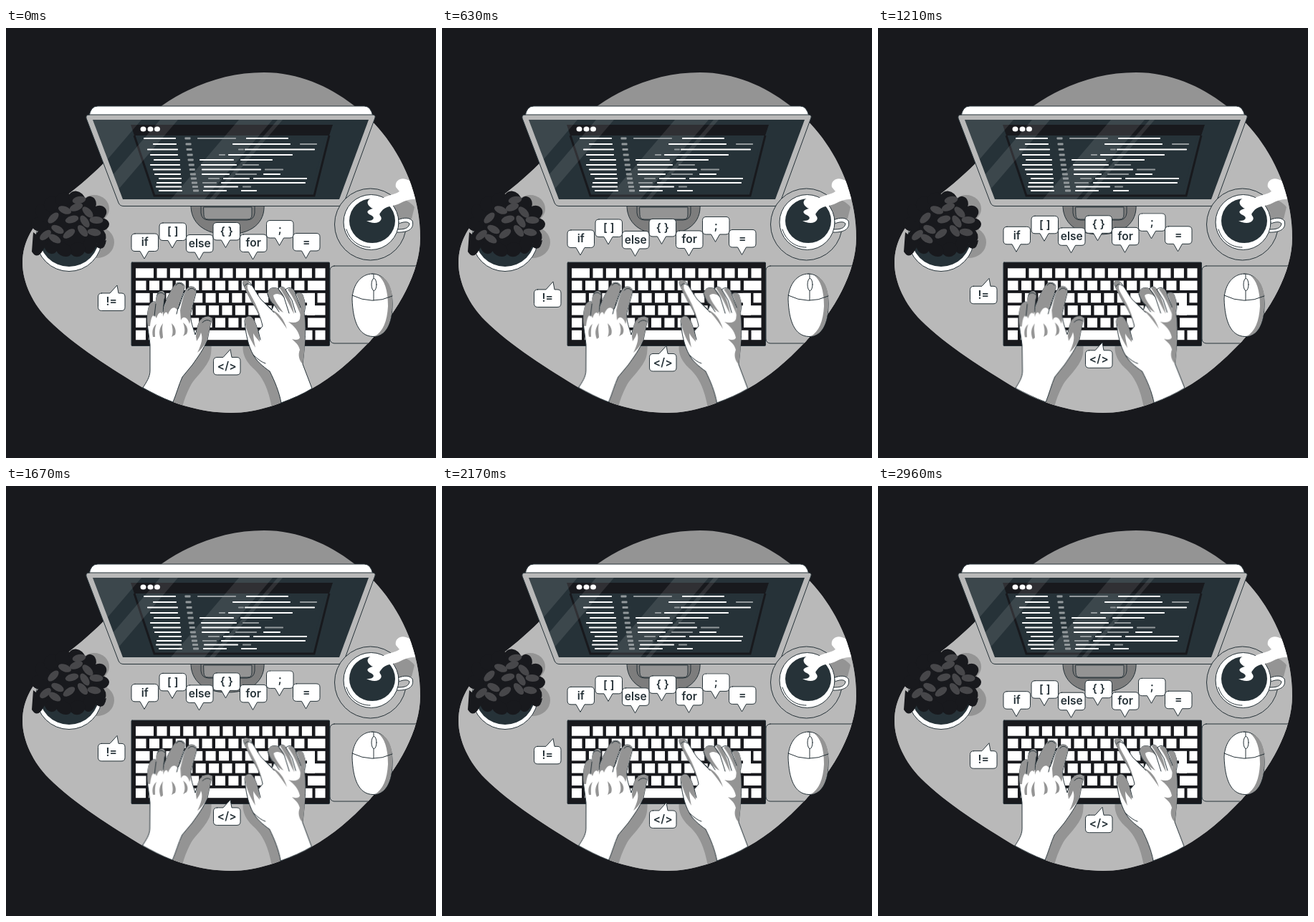
These frames come from a looping animation (600x600 px, 3000 ms). An HTML page:

```html
<!DOCTYPE html>
<html lang="en">
<head>
<meta charset="utf-8">
<title>Coding desk</title>
<style>
  html, body { margin: 0; width: 100%; height: 100%; overflow: hidden; background: #18191d; }
  svg { display: block; width: 100vw; height: 100vh; }
  text { font: 600 15.5px Inter, "Open Sans", sans-serif; fill: #263238; text-anchor: middle; }
  .ink { stroke: #263238; stroke-width: 1; stroke-linejoin: round; stroke-linecap: round; }
  .white { fill: #fff; }
  .desk { fill: #b9b9b9; }
  .grey { fill: #949494; }
  .dark { fill: #263238; }
  .black { fill: #18191d; }
  .none { fill: none; }
  #bubbles { animation: float 3s linear infinite; }
  .hand { animation: sway 1.5s linear infinite; }
  #left { transform-origin: 237px 437px; }
  #right { transform-origin: 379px 437px; }
  @keyframes float { 50% { transform: translateY(-12px); } }
  @keyframes sway {
    0%, 50%, 100% { transform: rotate(0deg); }
    25% { transform: rotate(1deg); }
    75% { transform: rotate(-1deg); }
  }
</style>
</head>
<body>
<svg viewBox="0 0 600 600">
  <defs>
    <path id="blob" d="M360 62C408 62 450 81 484 107C510 125 534 154 549 182C568 217 578 255 578 293C578 341 546 398 504 441C482 464 456 487 427 503C392 521 355 537 314 537C266 537 222 520 191 502C150 477 95 443 60 408C38 386 23 355 23 328C23 290 47 263 74 242C96 225 115 210 137 188C164 162 186 129 218 108C262 78 310 62 360 62Z"/>
    <clipPath id="inBlob"><use href="#blob"/></clipPath>
    <clipPath id="inScreen"><path d="M121 128H506L465 239H163Z"/></clipPath>
  </defs>

  <!-- wall and desk -->
  <use href="#blob" class="grey"/>
  <g clip-path="url(#inBlob)">
    <path class="desk" d="M0 122H600V600H0Z"/>
    <rect class="desk ink" x="452" y="332" width="140" height="108" rx="6"/>
    <path class="grey" d="M287 408C284 430 290 452 283 464C275 480 262 489 257 500C251 512 248 521 245 532L230 530L246 487L268 452Z"/>
    <path class="grey" d="M332 436C328 450 332 462 344 474C360 488 366 505 371 530L388 526L366 470L346 436Z"/>
  </g>

  <!-- monitor -->
  <path fill="#7d7d7d" class="ink" d="M258 246C257 272 277 288 309 288C342 288 362 272 360 246Z"/>
  <path fill="#7d7d7d" class="ink" d="M272 246V258Q273 268 283 268H336Q346 268 347 258V246Z"/>
  <path class="grey ink" d="M276 250H343V261Q343 267 337 267H282Q276 267 276 261Z"/>
  <path class="white ink" d="M116 123Q118 109 128 109H500Q509 109 512 123Z"/>
  <path class="desk ink" d="M116 121H511Q516 121 515 125L472 243Q470 248.500 464 248.500H164Q159 248.500 157 244L112 126Q111 121 116 121Z"/>
  <path class="dark" d="M121 128H506L465 239H163Z"/>
  <g clip-path="url(#inScreen)">
    <path d="M183 150H446L425 232H207Z" class="dark"/>
    <path class="black" d="M174 135H456L451 150H179Z"/>
    <path class="none" stroke="#18191d" stroke-width="3" d="M179 150L207 234H430L451 150"/>
    <path fill="#fff" opacity=".1" d="M121 128H189L130 197ZM215 128H240L145 239H120ZM325 128H372L277 239H230ZM379 128H386L291 239H284Z"/>
  </g>
  <g class="white">
    <ellipse cx="191.500" cy="141" rx="4" ry="3.500"/>
    <ellipse cx="201.500" cy="141" rx="4" ry="3.500"/>
    <ellipse cx="211" cy="141" rx="4" ry="3.500"/>
  </g>
  <g id="code"></g>

  <!-- plant -->
  <g class="grey">
    <ellipse cx="123" cy="252" rx="21" ry="19"/>
    <ellipse cx="127" cy="299" rx="24" ry="22"/>
  </g>
  <circle class="white ink" cx="88" cy="293.500" r="46"/>
  <circle class="dark" cx="88" cy="291" r="42"/>
  <g id="leaves" class="black"><ellipse cx="90" cy="273" rx="46" ry="37"/></g>
  <g id="veins" fill="#47474a"></g>

  <!-- cup -->
  <g clip-path="url(#inBlob)">
    <circle class="desk ink" cx="508.500" cy="274" r="50"/>
    <path class="grey" d="M528 240C548 234 562 240 570 250L566 266L546 270Z"/>
    <path class="white ink" d="M544 269C552 265 562 263 567 269C570 280 562 286 543 285Z"/>
    <path class="desk ink" d="M548 273C553 271 560 269 563 273C562 280 555 281 546 281Z"/>
    <circle class="white ink" cx="509.500" cy="271" r="38.500"/>
    <ellipse class="dark" cx="511" cy="269" rx="32" ry="31"/>
    <path class="none ink" d="M475 281C480 297 493 306 508 306"/>
    <path class="white" d="M544 222C542 214 550 208 558 211L584 220V240C566 238 561 239 551 244C541 250 529 247 523 257C518 262 526 262 523 268C520 273 511 273 503 269C513 270 516 264 509 261C500 257 506 253 512 252C505 249 502 243 507 239C512 234 519 240 525 238C532 233 542 233 549 228Z"/>
  </g>

  <!-- mouse -->
  <path class="white ink" d="M511 343C529 343 539 361 539 385C539 412 530 430.500 512 430.500C492 430 484 409 483 378C484 357 496 343 511 343Z"/>
  <path class="grey" d="M519 345C534 349 540 364 539 386C538 412 531 428 514 430.500C526 424 532 409 533 388C533 366 528 351 519 345Z"/>
  <path class="none ink" d="M483 373Q511 387 539 374M513 343V380"/>
  <ellipse class="white ink" cx="513.500" cy="358" rx="3.500" ry="8.500"/>

  <!-- keyboard -->
  <rect class="black ink" x="175" y="327" width="276.500" height="116.500" rx="1"/>
  <g id="keys" class="white"></g>

  <!-- hands -->
  <g id="left" class="hand">
    <path class="white ink" d="M191 502C196 494 201 487 201 478L201 442C200 430 197 418 197 408C197 398 199 387 202 384C205 381 208 381 209 384C210 374 211 367 217 367C222 367 222 372 221 377L219 391C223 381 229 367 236 358C239 353 249 355 249 361C248 370 243 379 240 392C245 383 248 361 258 361C264 361 266 365 265 370L258 397C256 407 262 420 264 428C267 420 268 410 273 406C279 401 287 402 287 407C284 417 283 426 281 435C276 448 267 460 260 470L246 487C241 498 238 510 233 522C217 516 204 509 191 502Z"/>
    <g class="grey">
      <path d="M198 416C196 402 198 387 202 384C205 381 209 382 209 386L207 402C205 399 202 404 201 416Z"/>
      <path d="M207 400C207 383 211 367 217 367C222 367 222 373 221 379L218 399C215 395 212 398 210 405Z"/>
      <path d="M219 394C224 378 232 362 236 358C239 353 249 355 249 361C248 369 242 381 239 394C236 388 230 389 226 400C224 394 221 396 219 403Z"/>
      <path d="M243 394C246 382 249 361 258 361C265 361 266 366 264 373L257 399C258 406 257 410 256 413C254 404 247 400 244 408Z"/>
      <path d="M265 430C267 418 268 409 273 406C279 401 287 402 287 407C284 417 283 426 281 435C277 443 272 449 267 453C273 441 275 432 272 425C271 430 268 434 266 437Z"/>
      <path d="M205 431C203 421 206 416 210 413C207 420 208 426 208 431ZM216 434C212 424 215 417 219 412C217 420 219 426 219 432ZM231 431C234 425 232 417 231 412C236 416 238 423 236 428ZM247 430C251 424 249 416 247 411C253 415 255 422 252 427Z"/>
    </g>
    <path class="none ink" stroke-width=".8" d="M237 359Q242 353 247 359M254 366Q259 360 264 366M211 372Q216 366 221 372M209 385L207 402M221 378L219 396M240 391L238 399M274 411Q280 405 285 409"/>
  </g>

  <g id="right" class="hand">
    <path class="white ink" d="M384 523C381 507 375 493 368 479C358 472 349 464 345 456C338 444 334 425 333 409C333 403 339 401 343 404C348 409 350 418 352 423L358 416C356 405 350 392 343 382C338 372 333 363 331 357C330 351 336 351 340 355C345 361 350 371 356 379L371 393L374 386C370 383 366 377 365 371C366 362 374 361 380 364C382 359 388 361 390 365C395 360 402 363 404 371C410 368 414 370 415 376C418 384 418 391 416 397C418 412 418 426 417 438C416 450 415 459 414 469L427 503C414 511 400 517 384 523Z"/>
    <g class="grey">
      <path d="M331 356C330 351 336 351 340 355C337 357 336 361 338 366C344 378 353 390 358 414C355 402 349 390 343 382C338 373 333 364 331 356Z"/>
      <path d="M333 409C333 403 339 401 343 404C348 409 350 418 352 424C353 430 354 434 354 438C350 433 347 430 345 426C345 434 347 440 348 446C340 434 335 421 333 409Z"/>
      <path d="M365 371C366 362 374 361 380 364C384 367 387 371 389 377C384 371 377 369 373 373C374 380 381 388 387 397C383 395 378 391 374 386C370 383 366 378 365 371Z"/>
      <path d="M382 363C385 359 390 362 392 369C396 376 400 386 402 399C397 391 392 377 382 363Z"/>
      <path d="M393 365C398 360 403 366 405 376C409 384 411 391 411 400C406 388 401 375 393 365Z"/>
      <path d="M405 371C413 367 416 374 417 384L416 397C419 422 417 449 414 469C409 464 407 456 410 449C408 441 403 438 399 434C405 436 409 435 410 432C408 422 402 416 394 410C402 412 408 411 410 406C412 394 410 382 405 371Z"/>
      <path d="M371 393C380 397 388 406 392 420C385 409 379 402 371 393Z"/>
    </g>
    <path class="none ink" stroke-width=".8" d="M333 360Q336 354 342 359M356 379L374 397M365 371C367 378 370 383 374 386L381 396M380 364L388 376L395 398M390 365L399 380L404 397M404 371L411 390M352 423L355 435M345 456Q355 466 362 468"/>
  </g>

  <g id="bubbles"></g>
</svg>

<script>
  const fill = (id, html) => document.getElementById(id).insertAdjacentHTML("beforeend", html);

  // code rows as "start-end" spans; "g" marks a grey span
  const rows = [
    "192-237 g267-321 335-394", "205-238 316-397 g410-434", "197-240 g324-332 333-431",
    "201-240 g297-306 310-400", "206-243 270-318 327-372", "201-243 272-322 g330-353",
    "205-244 273-356 g361-387", "207-244 273-312 g320-350 359-383", "213-245 g282-298 303-340 345-420",
    "210-245 g274-294 300-418", "209-245 276-324 g330-342", "213-246 275-308 328-350"
  ];
  const span = (a, b, y, color, h = 2) =>
    `<rect x="${a}" y="${y - h / 2}" width="${b - a}" height="${h}" rx=".7" fill="${color}"/>`;
  fill("code", rows.map((row, i) => {
    const y = 154 + i * 8 - i * i * 0.125;
    const mark = 249.5 + i * 1.05;
    return span(mark, mark + 8, y, "#93999c", 3) + row.split(" ").map(s => {
      const [a, b] = s.replace("g", "").split("-");
      return span(+a, +b, y, s[0] === "g" ? "#93999c" : "#fff");
    }).join("");
  }).join(""));

  // leaf clusters around the pot
  let leaves = "";
  for (let i = 0; i < 14; i++) {
    const a = i / 14 * Math.PI * 2;
    const x = 90 + 43 * Math.cos(a), y = 274 + 36 * Math.sin(a);
    leaves += `<ellipse cx="${x}" cy="${y}" rx="${11 + i % 3}" ry="${9 + i % 2}" transform="rotate(${i * 53} ${x} ${y})"/>`;
  }
  leaves += '<path d="M38 285L36 312Q42 322 49 314L58 300ZM122 302Q137 316 140 296Z"/>';
  fill("leaves", leaves);
  const veins = "66,265 82,254 98,250 114,257 126,268 55,289 72,281 92,267 107,283 123,285 88,287 68,294 102,240 110,270";
  fill("veins", veins.split(" ").map((p, i) => {
    const [x, y] = p.split(",");
    return `<ellipse cx="${x}" cy="${y}" rx="9.5" ry="5" transform="rotate(${i * 67 % 110 - 45} ${x} ${y})"/>`;
  }).join(""));

  // keys: width of first key, count of regular keys, start of last key
  const pitch = 18.4;
  const key = (x, end, row, h = 13.4) =>
    `<rect x="${x}" y="${335.3 + row * 17.3}" width="${end - x}" height="${h}"/>`;
  const layout = [[25, 12, 431.5], [14.5, 12, 421], [19.5, 11, 407.4], [24, 11, 411.5], [14.5, 12, 421]];
  let keys = "";
  layout.forEach(([first, count, last], row) => {
    keys += key(181, 181 + first, row);
    for (let i = 0; i < count; i++) {
      const x = 185.5 + first + i * pitch;
      keys += key(x, x + 14, row);
    }
    keys += key(last, row === 2 ? 431 : 445.5, row);
  });
  keys += key(420, 431, 2, 31) + key(434.5, 445.5, 2);
  for (const [a, b] of [[181, 195], [199, 213], [217, 236], [240, 355], [359, 374], [377, 391], [395, 409.5], [413, 427.5], [431.5, 445.5]])
    keys += key(a, b, 5);
  fill("keys", keys);

  // speech bubbles: text, left, top, tail tip x, tail direction
  const bubbles = [
    ["if", 175, 287, 193, 1], ["[ ]", 214, 272, 232, 1], ["else", 251.5, 288.5, 269.5, 1],
    ["{ }", 289, 271.5, 306.5, 1], ["for", 326.5, 288, 344.5, 1], [";", 363.5, 268.5, 381.5, 1],
    ["=", 400.5, 286.5, 418.5, 1], ["!=", 128.5, 370, 155, -1], ["&lt;/&gt;", 289.5, 459.5, 313, -1]
  ];
  fill("bubbles", bubbles.map(([label, x, y, tip, dir]) => {
    const top = dir < 0 ? `H${tip - 10}L${tip} ${y - 11}L${tip + 2} ${y}` : "";
    const base = dir > 0 ? `H${tip + 6}L${tip} ${y + 35}L${tip - 6} ${y + 24.5}` : "";
    return `<path class="white ink" d="M${x + 5} ${y}${top}H${x + 32.5}q5 0 5 5v14.500q0 5 -5 5${base}H${x + 5}q-5 0 -5 -5V${y + 5}q0 -5 5 -5Z"/>` +
      `<text x="${x + 18.7}" y="${y + 17.3}">${label}</text>`;
  }).join(""));
</script>
</body>
</html>
```
